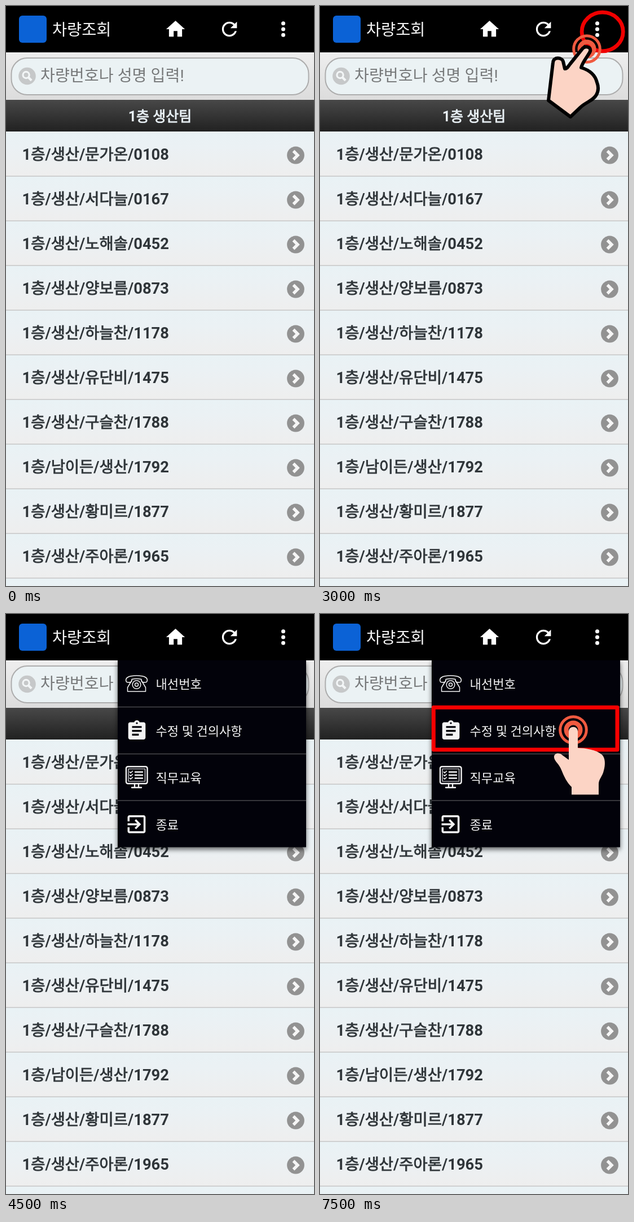
An HTML page for the animation above (8000 ms loop, 546 by 1026 pixels).

```html
<!DOCTYPE html>
<html lang="ko">
<head>
<meta charset="utf-8">
<title>차량조회</title>
<style>
  html, body { margin: 0; width: 100%; height: 100%; overflow: hidden; background: #000; }
  svg { display: block; width: 100%; height: 100%; }
  text { font-family: Roboto, "Noto Sans CJK KR", "Noto Sans CJK", sans-serif; white-space: pre; }
  .medium { stroke: currentColor; fill: currentColor; stroke-width: .9; }
  .medium tspan { font-weight: 700; stroke: none; }
  .step { opacity: 0; }
  .line { fill: none; stroke: #f4f4f4; stroke-linecap: round; stroke-linejoin: round; }
  .panel { filter: drop-shadow(0 4px 4px rgba(0, 0, 0, .6)); }
</style>
</head>
<body>
<svg viewBox="0 0 546 1026" preserveAspectRatio="none">
  <defs>
    <linearGradient id="rowFill" x2="0" y2="1">
      <stop stop-color="#e9f2f5"/><stop offset=".35" stop-color="#ebf1f4"/><stop offset="1" stop-color="#eeeeee"/>
    </linearGradient>
    <linearGradient id="searchFill" x2="0" y2="1">
      <stop stop-color="#eeeeee"/><stop offset="1" stop-color="#dcdcdc"/>
    </linearGradient>
    <linearGradient id="headFill" x2="0" y2="1">
      <stop stop-color="#484848"/><stop offset="1" stop-color="#212121"/>
    </linearGradient>
    <g id="rings" fill="none" stroke="#f05a40">
      <circle r="23.3" stroke-width="5"/>
      <circle r="12.5" stroke-width="8"/>
    </g>
  </defs>

  <!-- app bar -->
  <rect width="546" height="82"/>
  <rect x="23" y="17" width="49" height="48" rx="6" fill="#0b62d6"/>
  <text x="82" y="52" font-size="28.4" fill="#f6f6f6">차량조회</text>
  <g fill="#fff">
    <path transform="translate(280.6 21) scale(1.66)" d="M10 20v-6h4v6h5v-8h3L12 3 2 12h3v8z"/>
    <path transform="translate(376.2 21) scale(1.66)" d="M17.65 6.35C16.2 4.9 14.21 4 12 4c-4.42 0-7.99 3.58-7.99 8s3.57 8 7.99 8c3.73 0 6.84-2.55 7.73-6h-2.08c-.82 2.33-3.04 4-5.65 4-3.31 0-6-2.69-6-6s2.69-6 6-6c1.66 0 3.14.69 4.22 1.78L13 11h7V4z"/>
    <circle cx="491.5" cy="30.7" r="3.5"/>
    <circle cx="491.5" cy="41" r="3.5"/>
    <circle cx="491.5" cy="51.3" r="3.5"/>
  </g>

  <!-- search -->
  <rect y="82" width="546" height="84" fill="url(#searchFill)"/>
  <rect x="9.5" y="92" width="527" height="65" rx="28" fill="#ebf2f4" stroke="#adadad" stroke-width="2"/>
  <circle cx="37.5" cy="124" r="15.3" fill="#c6c8c9"/>
  <g fill="none" stroke="#f3f6f7">
    <circle cx="35.6" cy="122" r="5.6" stroke-width="3.2"/>
    <path d="M40 126.5l5.2 5.2" stroke-width="4.2"/>
  </g>
  <text x="61" y="133" font-size="28.2" fill="#77797a">차량번호나 성명 입력!</text>

  <!-- list -->
  <rect y="166" width="546" height="56" fill="url(#headFill)"/>
  <text class="medium" x="273" y="204" font-size="25" text-anchor="middle" color="#e9f1f6"><tspan>1</tspan>층 생산팀</text>
  <g id="list"></g>

  <g id="circle" class="step">
    <ellipse cx="500.7" cy="45.5" rx="36.6" ry="34.3" fill="none" stroke="#f00000" stroke-width="6.8"/>
  </g>

  <g id="tapMore" class="step">
    <use href="#rings" x="473" y="76"/>
    <path d="M464 77C469 70 481 71 479 80C477 86 465 99 463 109C473 112 487 119 491 135C494 143 494 150 490 157C484 168 471 170 462 179L444 196L405 167L413 100C414 89 429 91 431 98L434 111C438 111 440 107 443 103Z" fill="#fcd4c5" stroke="#000" stroke-width="6" stroke-linejoin="round"/>
  </g>

  <g id="menu" class="step">
    <rect class="panel" x="198" y="82" width="334" height="330.5" fill="#02020a"/>
    <path d="M198 164.5h334m-334 83h334m-334 82.5h334" stroke="#48484c" stroke-width="1.5"/>
    <g id="labels" font-size="22.1" fill="#f4f4f4"></g>
    <!-- phone -->
    <g class="line" stroke-width="1.5">
      <path d="M213 119C211 113 217 109 231.5 109S252 113 250 119Q249 122 242 120.5Q240 120 240 115.5Q231.5 113.5 223 115.5Q223 120 221 120.5Q214 122 213 119Z"/>
      <path d="M223 117.5L215.5 130V137H247.5V130L240 117.5"/>
      <circle cx="231.5" cy="125" r="7.3"/>
      <circle cx="231.5" cy="125" r="3"/>
    </g>
    <!-- monitor -->
    <g class="line" stroke-width="2.4">
      <rect x="213" y="270" width="37.5" height="30" rx="3"/>
      <rect x="217" y="274" width="29.5" height="22" stroke-width="1.2"/>
      <path d="M229 279.5h13m-13 5.5h13m-13 5.5h13"/>
      <path d="M219.5 279.5l1.7 1.5 3-3m-4.7 7l1.7 1.5 3-3m-4.7 7l1.7 1.5 3-3" stroke-width="1.7"/>
      <path d="M228 300v6m7-6v6m-12 1h17"/>
    </g>
    <g fill="#f4f4f4">
      <path transform="translate(211.6 186.3) scale(1.7)" d="M19 3h-4.18C14.4 1.84 13.3 1 12 1c-1.3 0-2.4.84-2.82 2H5c-1.1 0-2 .9-2 2v14c0 1.1.9 2 2 2h14c1.1 0 2-.9 2-2V5c0-1.1-.9-2-2-2zm-7 0c.55 0 1 .45 1 1s-.45 1-1 1-1-.45-1-1 .45-1 1-1zm2 14H7v-2h7v2zm3-4H7v-2h10v2zm0-4H7V7h10v2z"/>
      <path transform="translate(210.2 350.7) scale(1.77)" d="M10.09 15.59L11.5 17l5-5-5-5-1.41 1.41L12.67 11H3v2h9.67zM19 3H5c-1.11 0-2 .9-2 2v4h2V5h14v14H5v-4H3v4c0 1.1.89 2 2 2h14c1.1 0 2-.9 2-2V5c0-1.1-.9-2-2-2z"/>
    </g>
  </g>

  <g id="box" class="step">
    <rect x="201.3" y="165.3" width="325.7" height="74.7" fill="none" stroke="#f80000" stroke-width="7" stroke-linejoin="round"/>
  </g>

  <g id="tapItem" class="step">
    <use href="#rings" x="449" y="205"/>
    <path d="M441 208C441 197 457 197 457 208V237C470 237 490 240 500 249C506 255 506 267 503 277C501 287 494 292 494 301V319.5H446V306C438 299 432 286 428 276C424 265 416 261 415 254C414 246 424 244 430 250L441 258Z" fill="#fcd4c5"/>
  </g>
</svg>
<script>
  const LOOP = 8000;
  const ROW = 79;
  const LIST_TOP = 222;
  const rows = [
    '생산/문가온/0108', '생산/서다늘/0167', '생산/노해솔/0452', '생산/양보름/0873', '생산/하늘찬/1178',
    '생산/유단비/1475', '생산/구슬찬/1788', '남이든/생산/1792', '생산/황미르/1877', '생산/주아론/1965'
  ];
  const items = ['내선번호', '수정 및 건의사항', '직무교육', '종료'];

  // [id, shown from, shown until] in ms
  const steps = [
    ['circle', 1500, 4500],
    ['tapMore', 3000, 4500],
    ['menu', 4500, LOOP],
    ['box', 6000, LOOP],
    ['tapItem', 7500, LOOP]
  ];

  const byId = id => document.getElementById(id);

  const boldDigits = label => label.replace(/[\d/]+/g, '<tspan>$&</tspan>');

  // Each row carries the divider along its top edge.
  const rowBack = (y, divider) => `
    <rect y="${y}" width="546" height="${ROW}" fill="url(#rowFill)"/>
    ${divider ? `<rect y="${y - 0.7}" width="546" height="1.5" fill="#c6c6c6"/>` : ''}`;

  const rowMarkup = (label, i) => {
    const y = LIST_TOP + i * ROW;
    return rowBack(y, i > 0) + `
      <text class="medium" x="28.5" y="${y + 50}" font-size="27.4" color="#2f3539">${boldDigits('1층/' + label)}</text>
      <circle cx="513.5" cy="${y + 42}" r="15.4" fill="#929292"/>
      <path d="M509.5 ${y + 34.5}l7.5 7.5-7.5 7.5" fill="none" stroke="#f6f6f6" stroke-width="5.4"/>`;
  };

  byId('list').innerHTML = rows.map(rowMarkup).join('') + rowBack(LIST_TOP + rows.length * ROW, true);

  byId('labels').innerHTML = items
    .map((label, i) => `<text x="265.5" y="${131.5 + i * 83}">${label}</text>`)
    .join('');

  for (const [id, from, to] of steps) {
    const key = (time, opacity) => ({ offset: time / LOOP, opacity, easing: 'steps(1, end)' });
    const last = to < LOOP ? 0 : 1;
    byId(id).animate(
      [key(0, 0), key(from, 1), key(to, last), key(LOOP, last)],
      { duration: LOOP, iterations: Infinity }
    );
  }
</script>
</body>
</html>
```
